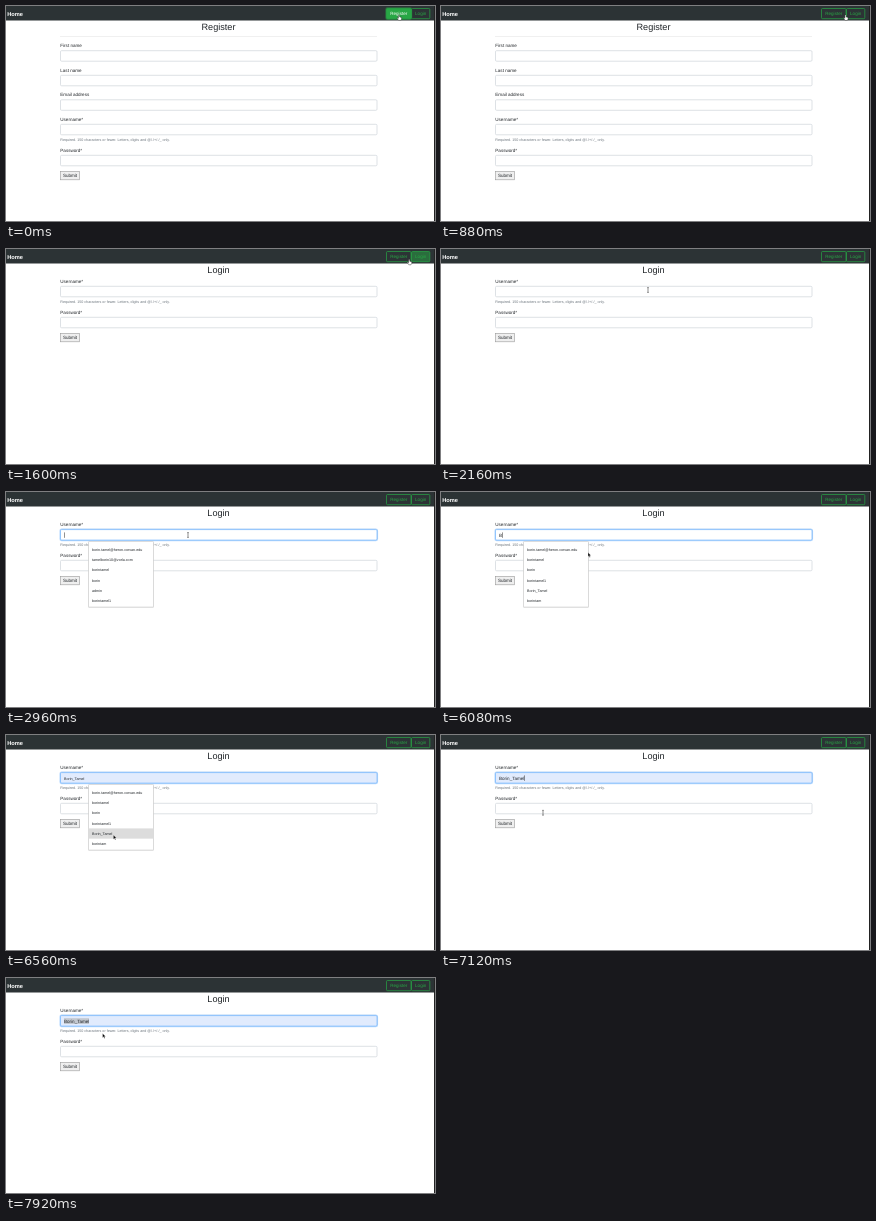
Write an HTML page that moves like this. It is 429 px wide and 215 px high and loops after 8000 ms.

```html
<!DOCTYPE html>
<html lang="en">
<head>
<meta charset="utf-8">
<title>Login form</title>
<style>
  html, body { margin: 0; width: 100%; height: 100%; overflow: hidden; background: #fff; }
  svg { display: block; width: 429px; height: 215px; }
  text { font-family: "Liberation Sans", Arial, sans-serif; font-size: 4.57px; fill: #212529; text-rendering: geometricPrecision; white-space: pre; }
  .title { font-size: 9.14px; text-anchor: middle; }
  .small { font-size: 3.66px; }
  .help { font-size: 3.66px; fill: #6c757d; }
  .mid { text-anchor: middle; }
</style>
</head>
<body>
<svg id="stage" viewBox="0 0 429 215"></svg>
<script>
const LOOP = 8000, STEP = 80;
const GREEN = '#28a745';
const PAGE_SWITCH = 1440, FOCUS = 2560, OPEN = 2800, TYPED = 4880, HAND_BACK = 6080, PICK = 6800, SELECT = 7520;
const NAME = 'Borin_Tamel';
const MAIL = 'borin.tamel@heron.corvan.edu';
const ALL = [MAIL, 'tamelborin10@vorla.com', 'borintamel', 'borin', 'admin', 'borintamel1'];
const FILTERED = [MAIL, 'borintamel', 'borin', 'borintamel1', NAME, 'borintam'];
const MENU = { x: 82.5, y: 49.5, w: 65, h: 65.5, first: 52.4, row: 10.25 };

// Pointer path: time, x, y
const PATH = [
  [0, 393, 9], [480, 393, 9], [800, 404.5, 9], [880, 404.5, 9], [1200, 412, 9],
  [1520, 412, 9], [2160, 207, 41], [2480, 182, 43], [6000, 182, 43], [6080, 147, 60.5],
  [6480, 107.4, 100], [6880, 107.4, 100], [7360, 96.6, 55.5], [LOOP, 96.6, 55.5]
];
const POINTERS = {
  hand: '<path d="M-.6 .3q.6-.9 1.2 0v1.6l2 .5v1.6l-.8 1.4h-2.2l-1.6-2.4.6-.4.8.7z" fill="#fff" stroke="#111" stroke-width=".4"/>',
  arrow: '<path d="M0 0v4.2l1-.9.7 1.6.7-.3-.7-1.5h1.3z" stroke="#fff" stroke-width=".3"/>',
  beam: '<path d="M-.8-2.4h1.6M0-2.4v4.8M-.8 2.4h1.6" fill="none" stroke="#444" stroke-width=".6"/>'
};

const ramp = (t, from, to) => Math.max(0, Math.min(1, (t - from) / (to - from)));
const rect = (x, y, w, h, attrs) => `<rect x="${x}" y="${y}" width="${w}" height="${h}" ${attrs}/>`;
const text = (x, y, s, cls = '', attrs = '') => `<text x="${x}" y="${y}" class="${cls}" ${attrs}>${s}</text>`;
const input = y => rect(54.5, y, 316.5, 10.5, 'rx="1.1" fill="#fff" stroke="#ced4da" stroke-width=".7"');
const field = (y, label) => text(54.3, y, label) + input(y + 3.7);

function pointerAt(t) {
  const i = PATH.findIndex((p, n) => n && t <= p[0]);
  const [t0, x0, y0] = PATH[i - 1], [t1, x1, y1] = PATH[i];
  const k = ramp(t, t0, t1), e = k * k * (3 - 2 * k);
  return { x: x0 + (x1 - x0) * e, y: y0 + (y1 - y0) * e };
}

function navButton(x, w, label, hover, glow) {
  return rect(x, 2.5, w, 10.2, `rx="1" fill="none" stroke="${GREEN}" stroke-width="2.4" opacity="${glow * .5}"`)
    + rect(x, 2.5, w, 10.2, `rx="1" fill="${GREEN}" fill-opacity="${hover}" stroke="${GREEN}" stroke-width=".7"`)
    + text(x + w / 2, 9.3, label, 'mid', `style="fill:${hover > .5 ? '#fff' : GREEN}"`);
}

function navbar(t) {
  const login = ramp(t, 960, 1120) * (1 - ramp(t, 1520, 1680));
  return rect(0, 0, 429, 14.5, 'fill="#2c3335"')
    + text(1.2, 9.7, 'Home', '', 'style="fill:#fff;font-size:5.7px;font-weight:bold"')
    + navButton(380.5, 24.5, 'Register', 1 - ramp(t, 720, 880), 1 - ramp(t, 160, 320))
    + navButton(405.5, 18.3, 'Login', login, 0);
}

const credentials = field(114.6, 'Username*')
  + text(54.3, 134.6, 'Required. 150 characters or fewer. Letters, digits and @/./+/-/_ only.', 'help')
  + field(145.6, 'Password*')
  + rect(54.5, 165.5, 19, 8.3, 'fill="#efefef" stroke="#999" stroke-width=".6"')
  + text(64, 171.2, 'Submit', 'mid');

const registerPage = text(212.5, 24, 'Register', 'title')
  + rect(54, 30.3, 317, .5, 'fill="#e0e0e0"')
  + field(41, 'First name') + field(65.6, 'Last name') + field(90.1, 'Email address')
  + credentials;

const loginPage = text(212.5, 24, 'Login', 'title')
  + `<g transform="translate(0 -81)">${credentials}</g>`;

function focusedInput(t, preview) {
  const filled = preview || t >= PICK;
  let out = `<g opacity="${ramp(t, FOCUS - STEP, FOCUS + STEP)}">`
    + rect(54.5, 37.6, 316.5, 10.5, 'rx="1.1" fill="none" stroke="#007bff" stroke-opacity=".25" stroke-width="2.2"')
    + rect(54.5, 37.6, 316.5, 10.5, `rx="1.1" fill="${filled ? '#e1ebfd' : '#fff'}" stroke="#80bdff" stroke-width=".8"`)
    + '</g>';
  if (t >= SELECT) out += rect(58, 40.2, 25, 5.8, 'fill="#c3c8d0"');
  if (preview) return out + text(58, 44.5, preview, 'small');
  const value = t >= PICK ? NAME : t >= TYPED ? NAME[0] : '';
  const caretX = t >= PICK ? 83.3 : t >= TYPED ? 61.4 : 58.2;
  const since = t - (t >= PICK ? PICK : t >= TYPED ? 4920 : FOCUS);
  const caretOn = t < SELECT && Math.floor(Math.max(0, since) / 500) % 2 === 0;
  return out + text(58, 44.8, value) + (caretOn ? rect(caretX, 40.4, .5, 5.4, 'fill="#222"') : '');
}

function menu(items, active) {
  const { x, y, w, h, first, row } = MENU;
  return rect(x - .5, y, w + 1, h + .8, 'rx="1" fill="#000" opacity=".12"')
    + rect(x, y, w, h, 'rx=".8" fill="#fff" stroke="#c4c4c4" stroke-width=".5"')
    + items.map((s, i) => (i === active ? rect(x, first + i * row, w, row, 'fill="#dcdcdc"') : '')
      + text(86, first + i * row + 6.4, s, 'small')).join('');
}

function render(t) {
  const { x, y } = pointerAt(t);
  const open = t >= OPEN && t < PICK;
  const items = t >= TYPED ? FILTERED : ALL;
  const inMenu = open && x > MENU.x && x < 146.5 && y > MENU.first;
  const active = inMenu ? Math.floor((y - MENU.first) / MENU.row) : -1;
  const overInput = t >= PAGE_SWITCH && !inMenu && x > 54 && x < 371 && (y > 38 && y < 48 || y > 69 && y < 79);
  const kind = y < 14 && x > 380 ? 'hand' : overInput ? 'beam' : 'arrow';
  const hidden = t >= TYPED && t < HAND_BACK;
  return rect(0, 0, 429, 215, 'fill="#fff"')
    + (t < PAGE_SWITCH ? registerPage : loginPage)
    + (t >= FOCUS ? focusedInput(t, items[active]) : '')
    + (open ? menu(items, active) : '')
    + navbar(t)
    + rect(428, 0, 1, 215, 'fill="#222"')
    + (hidden ? '' : `<g transform="translate(${x} ${y})">${POINTERS[kind]}</g>`);
}

const stage = document.getElementById('stage');
let shown = -1;
function tick() {
  const t = Math.floor(performance.now() % LOOP / STEP) * STEP;
  if (t !== shown) stage.innerHTML = render(shown = t);
  requestAnimationFrame(tick);
}
tick();
</script>
</body>
</html>
```
